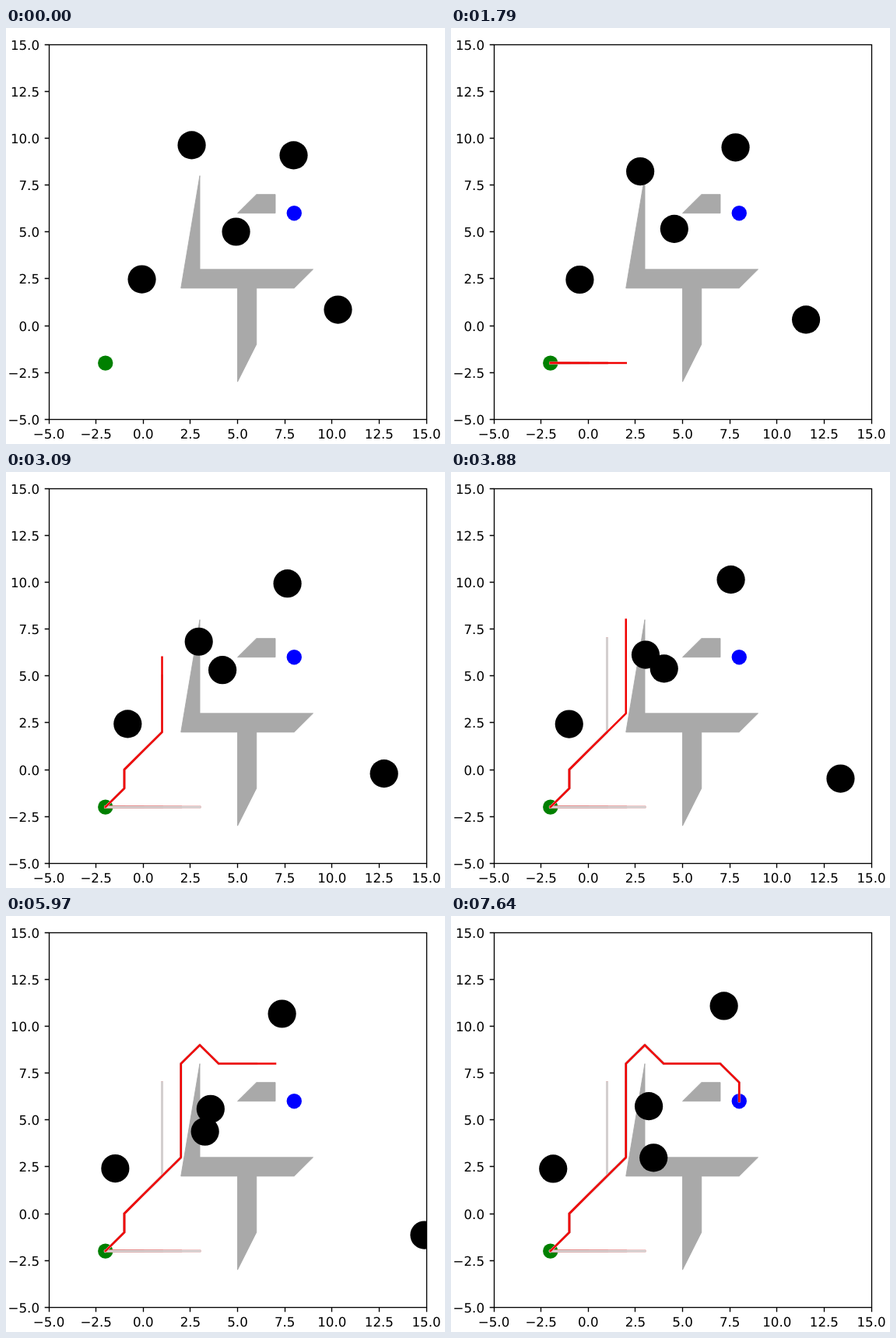
These frames come from a looping animation (564x534 px, 7670 ms). An HTML page with a canvas:

```html
<!DOCTYPE html>
<html lang="en">
<head>
<meta charset="utf-8">
<title>Path planning among moving obstacles</title>
<style>
  html, body { margin: 0; width: 100%; height: 100%; overflow: hidden; background: #fff; }
  canvas { display: block; }
</style>
</head>
<body>
<canvas id="stage" width="564" height="534"></canvas>
<script>
const ctx = document.getElementById('stage').getContext('2d');
const LOOP = 7670, STEP = 374, LEAD = 4, LAST = 19;
const LEFT = 55.5, TOP = 21.5, WIDTH = 485, HEIGHT = 481;
const px = x => 55 + (x + 5) * WIDTH / 20;
const py = y => 502.25 - (y + 5) * HEIGHT / 20;

const start = [-2, -2], goal = [8, 6];

const walls = [
  [[3, 8], [2, 2], [8, 2], [9, 3], [3, 3]],
  [[5, 2], [5, -3], [6, -1], [6, 2]],
  [[5, 6], [6, 7], [7, 7], [7, 6]]
];

const obstacles = [
  { x: 2.57, y: 9.63, vx: 0.047, vy: -0.35 },
  { x: 7.97, y: 9.09, vx: -0.041, vy: 0.105 },
  { x: 4.92, y: 5.01, vx: -0.09, vy: 0.038 },
  { x: -0.07, y: 2.47, vx: -0.094, vy: -0.004 },
  { x: 10.32, y: 0.85, vx: 0.305, vy: -0.133 }
];

// Expands corner points into unit moves, one per step
function route(...corners) {
  const points = [start];
  for (const [x, y] of corners) {
    let [cx, cy] = points[points.length - 1];
    while (cx !== x || cy !== y) {
      cx += Math.sign(x - cx);
      cy += Math.sign(y - cy);
      points.push([cx, cy]);
    }
  }
  return points;
}

const detour = [[-1, -1], [-1, 0]];
const plans = [
  { from: 0, path: route([3, -2]) },
  { from: 6, path: route(...detour, [1, 2], [1, 7]) },
  { from: 10, path: route(...detour, [2, 3], [2, 8], [3, 9], [4, 8], [7, 8], goal) }
];

// The part of the current plan covered after a number of steps
function walked(step) {
  const plan = plans.filter(p => step >= p.from).pop();
  return plan.path.slice(0, step + 1);
}

function trace(points) {
  ctx.beginPath();
  points.forEach(([x, y]) => ctx.lineTo(px(x), py(y)));
}

function line(points, color, width) {
  trace(points);
  ctx.strokeStyle = color;
  ctx.lineWidth = width;
  ctx.stroke();
}

function disc(x, y, r, color) {
  ctx.beginPath();
  ctx.arc(px(x), py(y), r, 0, Math.PI * 2);
  ctx.fillStyle = color;
  ctx.fill();
}

function drawWall(points) {
  trace(points);
  ctx.closePath();
  ctx.fillStyle = ctx.strokeStyle = '#a9a9a9';
  ctx.lineWidth = 0.9;
  ctx.fill();
  ctx.stroke();
}

function drawAxes() {
  ctx.strokeStyle = ctx.fillStyle = '#000';
  ctx.lineWidth = 1.33;
  ctx.strokeRect(LEFT, TOP, WIDTH, HEIGHT);
  ctx.font = '16.67px "DejaVu Sans", sans-serif';
  ctx.textRendering = 'geometricPrecision';
  ctx.beginPath();
  for (let v = -5; v <= 15; v += 2.5) {
    const label = v.toFixed(1).replace('-', '\u2212');
    const x = Math.floor(px(v)) + 0.5, y = Math.floor(py(v)) + 0.5;
    ctx.moveTo(x, TOP + HEIGHT);
    ctx.lineTo(x, TOP + HEIGHT + 5.8);
    ctx.moveTo(LEFT, y);
    ctx.lineTo(LEFT - 5.8, y);
    ctx.textAlign = 'center';
    ctx.fillText(label, px(v), 527);
    ctx.textAlign = 'right';
    ctx.fillText(label, 43, y + 6.1);
  }
  ctx.stroke();
}

function draw(step) {
  ctx.fillStyle = '#fff';
  ctx.fillRect(0, 0, 564, 534);

  ctx.save();
  ctx.beginPath();
  ctx.rect(LEFT, TOP, WIDTH, HEIGHT);
  ctx.clip();
  ctx.lineJoin = 'round';
  walls.forEach(drawWall);
  disc(...start, 9.7, '#008000');
  disc(...goal, 9.7, '#0000ff');

  // Each step greys out the previous path, then draws the new one over it
  ctx.lineCap = 'square';
  for (let k = 1; k <= step; k++) {
    if (k > 1) line(walked(k - 1), '#d3d3d3', 2.9);
    line(walked(k), '#f00000', 2.5);
  }
  for (const { x, y, vx, vy } of obstacles)
    disc(x + vx * step, y + vy * step, 18.1, '#000');
  ctx.restore();

  drawAxes();
}

const begin = performance.now();
function tick() {
  const t = (performance.now() - begin) % LOOP;
  draw(Math.min(LAST, Math.floor((t + LEAD) / STEP)));
  requestAnimationFrame(tick);
}
tick();
</script>
</body>
</html>
```
